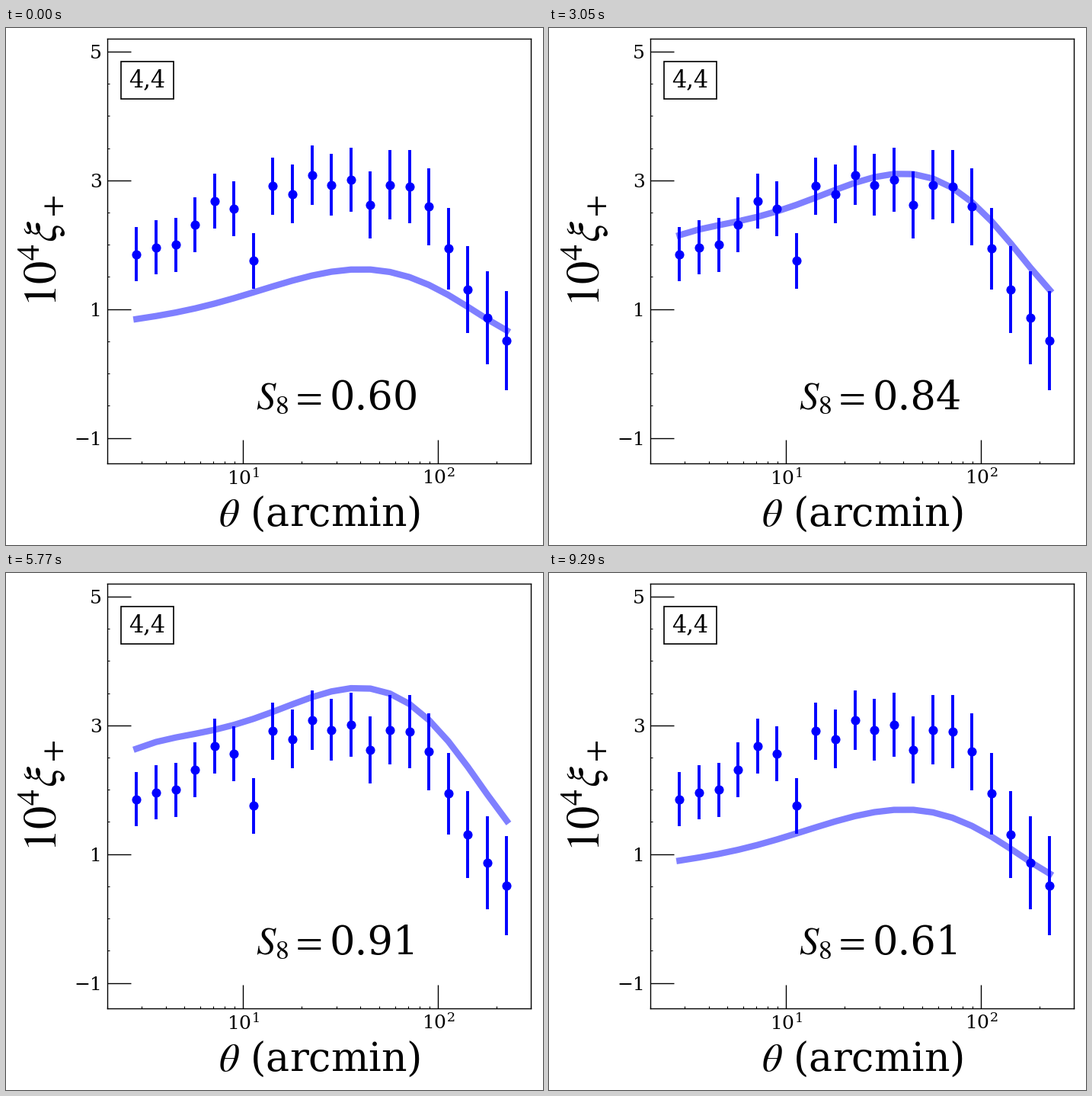
Animation of 705 by 678 pixels, one loop 9.45 s. Source, as a matplotlib script:

```python
import numpy as np
import matplotlib.pyplot as plt
from matplotlib.animation import FuncAnimation
from matplotlib.patches import Rectangle
from matplotlib.ticker import MultipleLocator, NullFormatter

W, H, DPI = 705, 678, 100
LOOP_MS = 9450
PEAK = 29                # step with the largest S8
FRAMES = 2 * PEAK + 1    # the first picture is held for two ticks

plt.rcParams.update({
    "font.family": "DejaVu Serif",
    "mathtext.fontset": "stix",
    "axes.linewidth": 1.0,
})

# Angular bins with the measured correlation in each
bins = np.arange(20)
theta = 2.834 * 10 ** (0.1 * bins)
xi = [1.85, 1.96, 2.00, 2.31, 2.68, 2.56, 1.75, 2.91, 2.79, 3.08,
      2.93, 3.01, 2.62, 2.93, 2.90, 2.59, 1.94, 1.30, 0.87, 0.51]
err = 0.42 + 0.35 * (bins / 19) ** 2.8

# Theory: smooth curves through key bins, blended by a parabola in the step
key_bins = (0, 2, 6, 10, 14, 17, 19)
key_steps = (0, 18, 28)
key_xi = np.array([
    [0.846, 0.947, 1.261, 1.581, 1.498, 1.036, 0.668],
    [2.149, 2.303, 2.620, 3.050, 2.884, 2.019, 1.296],
    [3.180, 3.376, 3.628, 4.033, 3.808, 2.718, 1.758],
])
blend = np.polyfit(key_steps, key_xi, 2)


def theory(step):
    heights = blend[0] * step ** 2 + blend[1] * step + blend[2]
    shape = np.polyfit(key_bins, heights, len(key_bins) - 1)
    return np.polyval(shape, bins)


def s8(step):
    return 0.6 + 0.39 * step / PEAK


fig = plt.figure(figsize=(W / DPI, H / DPI), dpi=DPI, facecolor="white")


def label(x, y, text, size, **kw):
    """Text with its baseline at pixel (x, y), measured from the top left."""
    return fig.text(x / W, 1 - y / H, text, fontsize=size, va="baseline", **kw)


left, right, top, bottom = 132.6, 689.4, 14, 571.4
ax = fig.add_axes([left / W, 1 - bottom / H, (right - left) / W, (bottom - top) / H])
ax.set_xscale("log")
ax.set_xlim(2, 300)
ax.set_ylim(-1.4, 5.2)
ax.set_yticks([-1, 1, 3, 5])
ax.yaxis.set_minor_locator(MultipleLocator(0.5))
ax.xaxis.set_minor_formatter(NullFormatter())
ax.tick_params(which="major", direction="in", length=22, width=1, labelsize=18)
ax.tick_params(which="minor", direction="in", length=2, width=0.8)
ax.tick_params(axis="x", which="major", pad=4.3)
ax.tick_params(axis="y", which="major", pad=5)

curve, = ax.plot(theta, theory(0), color="blue", alpha=0.5, lw=6, zorder=2)
ax.errorbar(theta, xi, yerr=err, fmt="o", color="blue", ms=8, mew=0.7,
            elinewidth=2.8, zorder=3)

fig.add_artist(Rectangle((151 / W, 1 - 93 / H), 68.5 / W, 49 / H,
                         fc="white", ec="black", lw=1.2))
label(161, 77, "4,4", 22)
label(411.5, 652.8, r"$\theta$ (arcmin)", 37.5, ha="center")
label(66, 366, r"$10^4\xi_+$", 43.5, rotation=90, rotation_mode="anchor")
label(328.5, 500, "$S_8=$", 36.5)
value = label(424, 500, "0.60", 38)


def draw(i):
    k = max(i - 1, 0)
    step = PEAK - abs(PEAK - k)
    curve.set_ydata(theory(step))
    value.set_text(f"{s8(step):.2f}")
    return curve, value


anim = FuncAnimation(fig, draw, frames=FRAMES, interval=LOOP_MS / FRAMES,
                     repeat=True, repeat_delay=0, blit=False)
plt.show()
```
